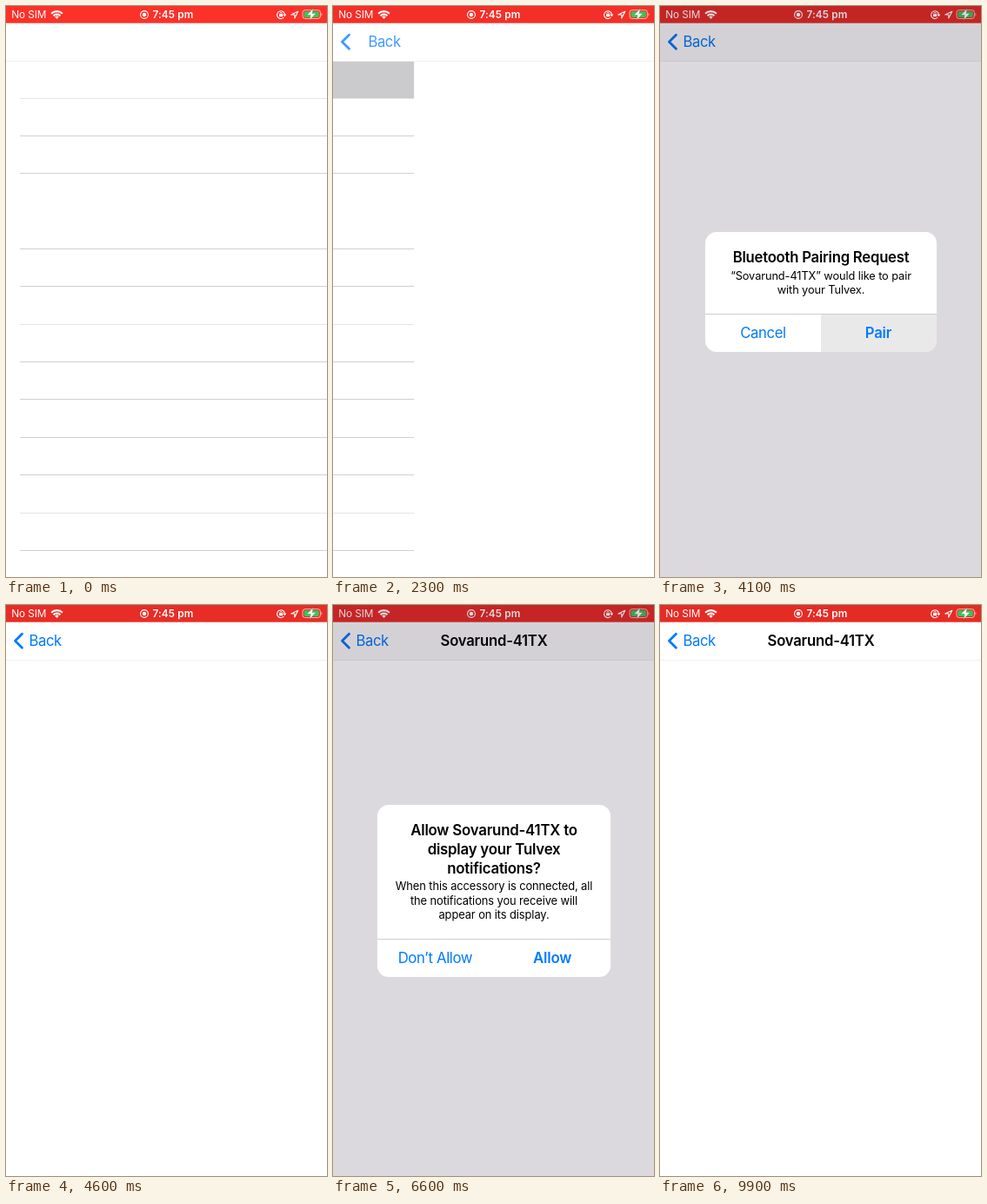
Write an HTML page that moves like this. It is 369 px wide and 657 px high and loops after 10000 ms.

```html
<!DOCTYPE html>
<html lang="en">
<head>
<meta charset="utf-8">
<title>Pairing flow</title>
<style>
  html, body { margin: 0; width: 100%; height: 100%; overflow: hidden; background: #fff; }
  svg { display: block; width: 369px; height: 657px; }
  text { font: 400 16.7px Inter, "Open Sans", sans-serif; letter-spacing: -.4px; }
  .bold { font-weight: 600; letter-spacing: -.23px; }
  .small { font-size: 12.8px; letter-spacing: -.1px; }
  .status { font-size: 11.8px; letter-spacing: -.1px; fill: #fff; }
  .mid { text-anchor: middle; }
  .link { fill: #007aff; }
  .white { fill: #fff; }
  .line { fill: none; stroke: #fff; stroke-width: 1.1; }
</style>
</head>
<body>
<svg viewBox="0 0 369 657">
  <rect width="369" height="657" fill="#fff"/>
  <g id="list">
    <rect id="picked" y="64" width="369" height="42" fill="#cbcbcd"/>
  </g>
  <rect id="page" y="64" width="369" height="593" fill="#fff"/>

  <rect y="19" width="369" height="44" fill="#fff"/>
  <rect y="63" width="369" height="1" fill="#f0f0f1"/>
  <g id="nav">
    <path d="M18.5 33.2 10.5 41.2 18.5 49.2" fill="none" stroke="#007aff" stroke-width="2.8" stroke-linecap="round" stroke-linejoin="round"/>
    <text id="back" class="link" x="26.5" y="47">Back</text>
  </g>
  <text id="title" class="bold mid" x="185" y="47">Sovarund-41TX</text>

  <rect id="bar" width="369" height="19.7"/>
  <text class="status" x="6.3" y="14">No SIM</text>
  <g fill="none" stroke="#fff" stroke-width="2.1">
    <path d="M52.1 8.7a9.2 9.2 0 0 1 12.8 0M54.5 11.3a5.7 5.7 0 0 1 8 0"/>
  </g>
  <path class="white" d="M58.5 15 56.2 12.6a3.3 3.3 0 0 1 4.6 0z"/>
  <circle class="line" cx="159" cy="10" r="4.4"/>
  <circle class="white" cx="159" cy="10" r="2.2"/>
  <text class="status" x="168.5" y="14" style="font-weight:600;letter-spacing:.1px">7:45 pm</text>
  <path class="line" d="M319.4 13a4.4 4.4 0 1 1 1-2.6M318.8 9.6l1.6 1.7 1.4-1.7"/>
  <path class="line" d="M314.9 9.6V8.6a1.2 1.2 0 0 1 2.4 0v1" style="stroke-width:.8"/>
  <rect class="white" x="314" y="9.3" width="4.2" height="3" rx=".5"/>
  <path class="line" d="M335.8 6.2 327.8 10h4v4z" stroke-linejoin="round"/>
  <rect x="341" y="4.7" width="20.4" height="9.8" rx="2.7" fill="none" stroke="#fff" stroke-opacity=".65"/>
  <rect x="342.6" y="6.2" width="17.2" height="6.8" rx="1.4" fill="#34c759"/>
  <path d="M362.5 8a2 2 0 0 1 0 3.4z" fill="#fff" opacity=".7"/>
  <path d="M353.1 2.9 345.9 10.6h4.2l-1 5.7 7.2-7.8h-4.2z" fill="#fff" stroke="#34a04c" stroke-width=".5"/>

  <g id="dim">
    <rect width="369" height="657" fill="#1a0022" opacity=".15"/>
    <rect y="19.7" width="369" height="44" opacity=".04"/>
  </g>

  <g id="pair">
    <rect x="52" y="260" width="266" height="138" rx="13" fill="#fff"/>
    <path id="pressed" d="M185 355H318V385a13 13 0 0 1-13 13H185z" fill="#e9e9ea"/>
    <rect x="52" y="354" width="266" height="1" fill="#cfcfd1"/>
    <text class="bold mid" x="185" y="295">Bluetooth Pairing Request</text>
    <text class="small mid" x="185" y="315">“Sovarund-41TX” would like to pair</text>
    <text class="small mid" x="185" y="331">with your Tulvex.</text>
    <text class="link mid" x="118.5" y="382">Cancel</text>
    <text class="link bold mid" x="251" y="382">Pair</text>
  </g>

  <g id="allow">
    <rect x="52" y="230.8" width="266" height="196.4" rx="13" fill="#fff"/>
    <rect x="52" y="383.6" width="266" height="1" fill="#cfcfd1"/>
    <text class="bold mid" x="185" y="266">Allow Sovarund-41TX to</text>
    <text class="bold mid" x="185" y="287.7">display your Tulvex</text>
    <text class="bold mid" x="185" y="308.8">notifications?</text>
    <text class="small mid" x="185" y="328.5">When this accessory is connected, all</text>
    <text class="small mid" x="185" y="344.5">the notifications you receive will</text>
    <text class="small mid" x="185" y="360.5">appear on its display.</text>
    <text class="link mid" x="118" y="411.5">Don’t Allow</text>
    <text class="link bold mid" x="251.5" y="411.5">Allow</text>
  </g>
</svg>
<script>
const el = id => document.getElementById(id);
const ramp = (t, start, length) => Math.min(1, Math.max(0, (t - start) / length));
const easeOut = p => 1 - (1 - p) ** 3;
const show = (id, opacity) => el(id).setAttribute('opacity', opacity);
const move = (id, value) => el(id).setAttribute('transform', value);

// Row separators; the fourth row is twice as tall
for (let k = 1; k <= 13; k++) {
  if (k === 4) continue;
  const line = document.createElementNS('http://www.w3.org/2000/svg', 'rect');
  const attrs = {
    x: 16, y: Math.floor(62.7 + 43.36 * k), width: 369 + 94, height: 1,
    fill: [1, 7, 12].includes(k) ? '#e4e4e5' : '#d0d0d2'
  };
  for (const name in attrs) line.setAttribute(name, attrs[name]);
  el('list').append(line);
}

function popup(id, t, start, end) {
  const visible = ramp(t, start, 220) * (1 - ramp(t, end, 250));
  const scale = 1 + .18 * (1 - easeOut(ramp(t, start, 500)));
  show(id, visible);
  move(id, `translate(184.5 329) scale(${scale}) translate(-184.5 -329)`);
  return visible;
}

function draw(t) {
  const push = easeOut(ramp(t, 2117, 500));
  show('picked', t >= 2000 ? 1 : 0);
  move('list', `translate(${-110 * push})`);
  move('page', `translate(${369 * (1 - push)})`);
  show('nav', push);
  move('back', `translate(${55 * (1 - push)})`);
  show('title', ramp(t, 6050, 150));

  const pair = popup('pair', t, 3000, 4180);
  const allow = popup('allow', t, 6280, 7200);
  show('dim', Math.max(pair, allow));
  show('pressed', t >= 3950 ? 1 : 0);

  // Recording bar pulses slowly
  const glow = .5 + .5 * Math.cos(2 * Math.PI * (t / 2700 - .05));
  const level = .89 + .11 * glow;
  el('bar').setAttribute('fill', `rgb(${[253, 49, 40].map(c => Math.round(c * level))})`);
}

const begin = performance.now();
function tick() {
  draw((performance.now() - begin) % 10000);
  requestAnimationFrame(tick);
}
tick();
</script>
</body>
</html>
```
